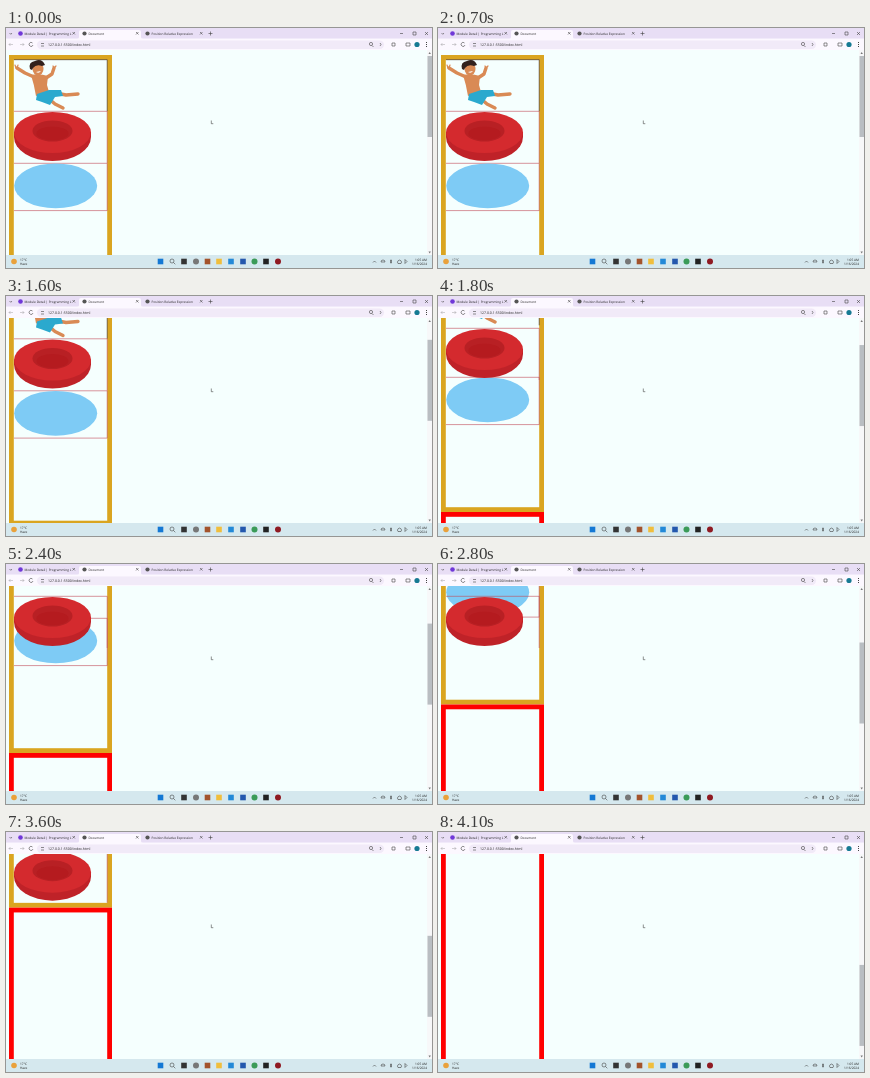
An HTML page that plays this animation: 426 px wide and 240 px high, repeating every 4500 ms.

```html
<!DOCTYPE html>
<html lang="en">
<head>
<meta charset="utf-8">
<title>Sticky position</title>
<style>
html, body { margin: 0; height: 100%; overflow: hidden; background: #f5fffe; }
svg { display: block; width: 426px; height: 240px; font: 3.2px "Open Sans", sans-serif; fill: #222; text-rendering: geometricPrecision; }
.line { fill: none; stroke: #c04a58; stroke-width: .6; }
.limb { fill: none; stroke: #d98a55; stroke-width: 3.4; stroke-linecap: round; stroke-linejoin: round; }
.icon { fill: none; stroke: #444; stroke-width: .6; }
</style>
</head>
<body>
<svg viewBox="0 0 426 240">
  <clipPath id="view"><rect y="22" width="421" height="205"/></clipPath>
  <rect width="426" height="240" fill="#f5fffe"/>

  <g clip-path="url(#view)">
    <g id="page">
      <g fill="none" stroke-width="4.8">
        <rect x="5.4" y="29.4" width="98.200" height="238.200" stroke="#daa520"/>
        <rect x="5.4" y="272.4" width="98.200" height="238.200" stroke="#f00"/>
      </g>
      <path class="line" d="M8 31.7H101.200V83.300" style="stroke:#322"/>
      <g id="boy">
        <path class="limb" d="M28 49L19 45 11 40M40 50L46 46 48 40"/>
        <path class="limb" d="M10 40L9 37M11 40L12 37M48 40L47 38M48 40L50 38" stroke-width="1" style="stroke-width:1.200"/>
        <path class="limb" d="M50 65L60 67 72 66M42 70L49 76 57 80"/>
        <path d="M25 47Q33 45 42 48L41 57 43 64 30 68Q28 56 25 47Z" fill="#d98a55"/>
        <path d="M31 66L43 62 55 62 57 68 49 69 44 77 36 74 30 72Z" fill="#2ba9ce"/>
        <ellipse cx="32" cy="41" rx="5.500" ry="6.500" fill="#d98a55"/>
        <path d="M24 41Q22 34 29 33 36 30 39 37L36 38Q30 36 27 40L26 42Z" fill="#32211d"/>
        <path d="M30 44Q33 46 35 43Z" fill="#fff"/>
      </g>
      <path class="line" d="M8 135.300H101.200V182.600H8"/>
      <ellipse cx="49.700" cy="157.800" rx="41.500" ry="22.400" fill="#7ecbf5"/>
    </g>
    <g id="ring">
      <path class="line" d="M8 .3H101.200V52"/>
      <path d="M8 21V26A38.500 24 0 0 0 85 26V21Z" fill="#bf2228"/>
      <ellipse cx="46.500" cy="21.500" rx="38.500" ry="20.500" fill="#d42a2e"/>
      <ellipse cx="46.500" cy="20" rx="20" ry="10.500" fill="#b82024"/>
      <ellipse cx="46.500" cy="22.500" rx="16" ry="7" fill="#b51b1f"/>
    </g>
  </g>

  <g id="scrollbar">
    <rect x="421" y="22" width="5" height="205" fill="#f7f8f9"/>
    <path d="M422.500 26l1.200-2 1.200 2zM422.500 223.500l1.200 2 1.200-2z" fill="#777"/>
    <rect id="thumb" x="421.500" y="28" width="4.500" height="81" fill="#b9bec2"/>
  </g>
  <path class="icon" d="M205.300 92.500v3.200h2"/>

  <g id="browser">
    <rect width="426" height="11" fill="#e8def5"/>
    <rect y="10.500" width="426" height="11.500" fill="#fcf8ff"/>
    <path d="M71 11q2 0 2-2V4q0-2 2-2h58q2 0 2 2v5q0 2 2 2z" fill="#fcf8ff"/>
    <rect x="31" y="12.500" width="347" height="8.500" rx="4.200" fill="#f1eaf8"/>
    <circle cx="14.500" cy="5.500" r="2.300" fill="#7038d8"/>
    <circle cx="78.500" cy="5.500" r="2.100" fill="#555"/>
    <circle cx="141.500" cy="5.500" r="2.100" fill="#555"/>
    <text x="18.500" y="6.800">Module Detail | Programming L</text>
    <text x="82.500" y="6.800">Document</text>
    <text x="145.500" y="6.800">Position Relative Expression</text>
    <text x="42" y="17.800" font-size="3.500">127.0.0.1:5500/index.html</text>
    <path class="icon" d="M3.500 5l1.300 1.300L6 5M66.500 4l2.500 2.500m0-2.500l-2.500 2.500M130 4l2.500 2.500m0-2.500L130 6.500M194 4l2.500 2.500m0-2.500L194 6.500M202.500 5.500h4m-2-2v4M394 5.500h3M407 4h3v3h-3zM419 4l3 3m0-3l-3 3"/>
    <path class="icon" d="M26.500 15a2 2 0 1 0 .5 2M35 15.500h3M35 18h3M366 17.500l1.500 1.500M374 15l1 1.500-1 1.500M386 15h3v3h-3zM400 15h4v3h-4z"/>
    <path class="icon" d="M7 16.500H3m1.500-1.500L3 16.500 4.500 18M14 16.500h4m-1.500-1.500l1.500 1.500-1.500 1.500" opacity=".4"/>
    <circle class="icon" cx="365" cy="16" r="1.600"/>
    <circle cx="411" cy="16.500" r="2.600" fill="#177a93"/>
    <path d="M420 14h1v1h-1zm0 2h1v1h-1zm0 2h1v1h-1z" fill="#444"/>
  </g>

  <g id="taskbar">
    <rect y="227" width="426" height="13" fill="#d5e8ee"/>
    <circle cx="8" cy="233.500" r="2.800" fill="#e9a13b"/>
    <text x="14" y="232.500">17°C</text>
    <text x="14" y="237">Haze</text>
    <circle class="icon" cx="166" cy="233" r="2"/>
    <path class="icon" d="M167.500 234.500l1.800 1.800M367 234.500l1.500-1.500 1.500 1.500M375 234q0-2 2-2t2 2zM384.500 232v3h1v-3zM392 235.500a2 2 0 1 1 3 0zM399 231.500v4l2-2z"/>
    <text x="421" y="232.500" text-anchor="end">1:05 AM</text>
    <text x="421" y="237" text-anchor="end">1/16/2024</text>
  </g>
</svg>
<script>
const LOOP = 4500, STEP = 100;
const scrollKeys = [
  [0, 0], [900, 0], [1200, 13.5], [1800, 54], [2400, 81], [2500, 81],
  [2800, 129.5], [3400, 164.5], [4100, 269], [LOOP, 269]
];
const [page, ring, thumb, taskbar] =
  ["page", "ring", "thumb", "taskbar"].map(id => document.getElementById(id));

function addIcon(x, color, round) {
  const icon = document.createElementNS("http://www.w3.org/2000/svg", round ? "circle" : "rect");
  const attrs = round
    ? { cx: x, cy: 233.5, r: 3 }
    : { x: x - 2.8, y: 230.7, width: 5.6, height: 5.6 };
  for (const name in attrs) icon.setAttribute(name, attrs[name]);
  icon.setAttribute("fill", color);
  taskbar.append(icon);
}
[
  [154.5, "#1478d4"], [178, "#333"], [190, "#777", true], [201.5, "#a3532c"],
  [213, "#f0be3c"], [225, "#2389d7"], [237, "#2458ad"], [248.5, "#3b9b58", true],
  [260, "#222"], [272, "#8f1a22", true]
].forEach(icon => addIcon(...icon));

function scrollAt(time) {
  const i = scrollKeys.findIndex(([t]) => t > time);
  const [t0, s0] = scrollKeys[i - 1], [t1, s1] = scrollKeys[i];
  return s0 + (s1 - s0) * (time - t0) / (t1 - t0);
}

const moveTo = (el, y) => el.setAttribute("transform", `translate(0 ${y})`);

function draw() {
  const time = Math.floor(performance.now() % LOOP / STEP) * STEP;
  const scroll = scrollAt(time);
  moveTo(page, -scroll);
  // Sticky: held 10px below the viewport top until its container ends.
  moveTo(ring, Math.min(Math.max(83 - scroll, 32), 213 - scroll));
  moveTo(thumb, scroll * .39);
  requestAnimationFrame(draw);
}
draw();
</script>
</body>
</html>
```
